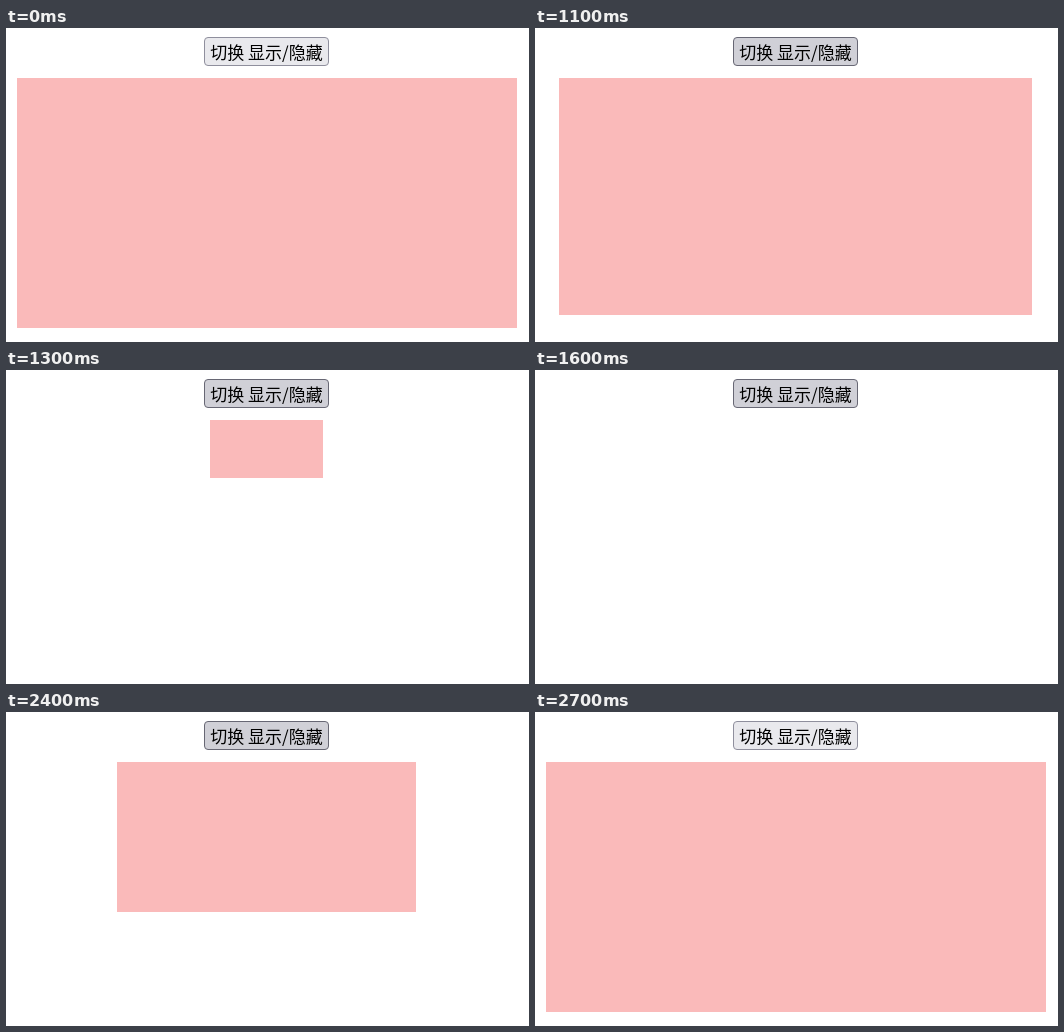
An HTML page for the animation above (3.4 s loop, 523x314 px).

```html
<!DOCTYPE html>
<html lang="zh-CN">
<head>
<meta charset="utf-8">
<title>切换 显示/隐藏</title>
<style>
  html, body {
    margin: 0;
    width: 100%;
    height: 100%;
    overflow: hidden;
    background: #fff;
  }
  #toggle {
    position: absolute;
    left: 198px;
    top: 9px;
    box-sizing: border-box;
    width: 125px;
    height: 29px;
    padding: 0;
    border: 1px solid #8f8f9d;
    border-radius: 4px;
    background: #e9e9ed;
    color: #000;
    font: 17px/27px "Noto Sans CJK SC", "Noto Sans CJK", sans-serif;
    text-align: center;
    white-space: nowrap;
  }
  #toggle.hover { background: #d0d0d7; border-color: #676774; }
  #toggle.pressed { background: #b1b1b9; border-color: #484851; }
  #panel {
    position: absolute;
    top: 50px;
    background: #fababa;
  }
</style>
</head>
<body>
<div id="toggle">切换 显示/隐藏</div>
<div id="panel"></div>
<script>
  const LOOP = 3400, STEP = 100, DURATION = 500;
  const HIDE_AT = 1065.7, PRESS_AT = 2200, SHOW_AT = 2226, LEAVE_AT = 2700;
  const CENTER = 260.5;
  const toggle = document.getElementById('toggle');
  const panel = document.getElementById('panel');

  const bezier = (a, b, u) =>
    3 * u * (1 - u) ** 2 * a + 3 * u * u * (1 - u) * b + u ** 3;

  // CSS "ease": cubic-bezier(.25, .1, .25, 1)
  function ease(x) {
    if (x <= 0) return 0;
    if (x >= 1) return 1;
    let low = 0, high = 1;
    for (let i = 0; i < 30; i++) {
      const mid = (low + high) / 2;
      if (bezier(0.25, 0.25, mid) < x) low = mid;
      else high = mid;
    }
    return bezier(0.1, 1, low);
  }

  function hiddenAmount(t) {
    if (t >= LEAVE_AT) return 0;
    if (t < PRESS_AT) return ease((t - HIDE_AT) / DURATION);
    return 1 - ease((t - SHOW_AT) / DURATION);
  }

  function buttonState(t) {
    if (t < 900 || t >= LEAVE_AT) return '';
    return t >= PRESS_AT && t < PRESS_AT + STEP ? 'pressed' : 'hover';
  }

  function draw(now) {
    const t = Math.floor((now % LOOP) / STEP) * STEP;
    const hidden = hiddenAmount(t);
    const half = Math.max(0, 250 - 252 * hidden);
    const left = Math.round(CENTER - half);
    const right = Math.round(CENTER + half);
    panel.style.left = left + 'px';
    panel.style.width = right - left + 'px';
    panel.style.height = Math.round(250 * (1 - hidden)) + 'px';
    toggle.className = buttonState(t);
  }

  const start = performance.now();
  function tick() {
    draw(performance.now() - start);
    requestAnimationFrame(tick);
  }
  tick();
</script>
</body>
</html>
```
